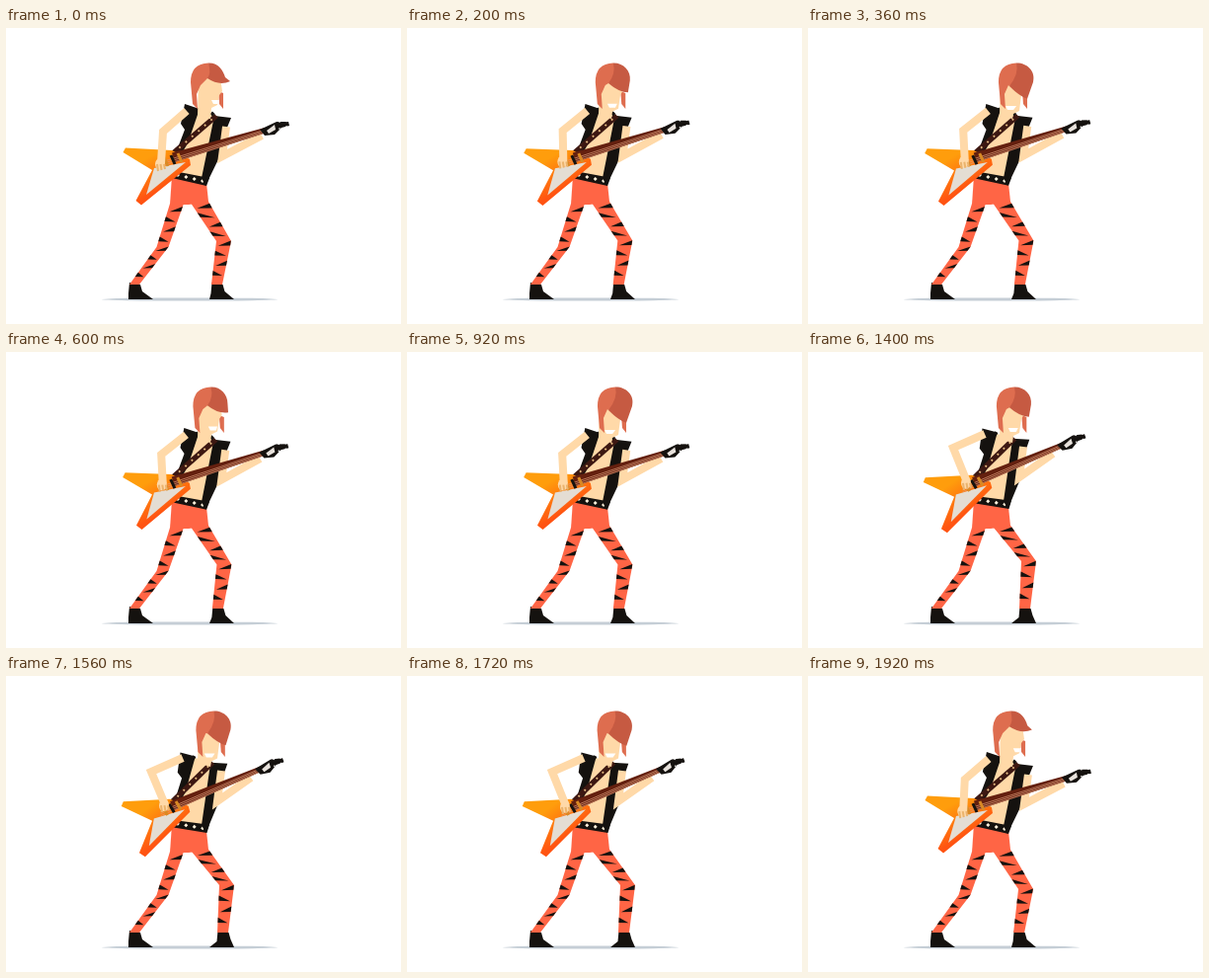
Write an HTML page with a canvas that moves like this. It is 400 px wide and 300 px high and loops after 1960 ms.

```html
<!DOCTYPE html>
<html lang="en">
<head>
<meta charset="utf-8">
<title>Guitarist</title>
<style>
html, body { margin: 0; width: 100%; height: 100%; overflow: hidden; background: #fff; }
canvas { display: block; width: 400px; height: 300px; }
</style>
</head>
<body>
<canvas id="stage" width="400" height="300"></canvas>
<script>
const ctx = document.getElementById('stage').getContext('2d');
const LOOP = 1960, STEP = 40;
const SKIN = '#ffd9a8', BLACK = '#15120f', PANTS = '#ff6545';
const HAIR = '#de6d4f', FRINGE = '#c65a42', STRAP = '#3d1812', CREAM = '#fff1dc';

const lerp = (a, b, k) => a + (b - a) * k;
const mix = (a, b, k) => a.map((v, i) => lerp(v, b[i], k));

// Eased value between [time, value] keys
function track(keys, t) {
  const i = Math.max(1, keys.findIndex(key => key[0] >= t));
  const [t0, a] = keys[i - 1], [t1, b] = keys[i];
  const k = (t - t0) / (t1 - t0);
  return lerp(a, b, k * k * (3 - 2 * k));
}

const HEAD = [[0, 0], [340, 1], [630, .38], [940, 1], [1320, .6], [1680, 1], [1920, .03], [LOOP, 0]];
const LEAN = [[0, 0], [300, .15], [980, .15], [1300, 1], [1730, 1], [1920, .02], [LOOP, 0]];

function poly(fill, ...points) {
  ctx.beginPath();
  points.forEach(p => ctx.lineTo(...p));
  ctx.closePath();
  ctx.fillStyle = fill;
  ctx.fill();
}

function stroke(color, width, ...points) {
  ctx.beginPath();
  points.forEach(p => ctx.lineTo(...p));
  ctx.strokeStyle = color;
  ctx.lineWidth = width;
  ctx.stroke();
}

function oval(fill, x, y, rx, ry) {
  ctx.beginPath();
  ctx.ellipse(x, y, rx, ry, 0, 0, Math.PI * 2);
  ctx.fillStyle = fill;
  ctx.fill();
}

// Evenly spaced diamonds from one point to another
function studs(color, from, to, n, r) {
  for (let i = 0; i < n; i++) {
    const [x, y] = mix(from, to, i / (n - 1));
    poly(color, [x - r, y], [x, y - r], [x + r, y], [x, y + r]);
  }
}

function turned(pivot, angle, shift, paint) {
  ctx.save();
  ctx.translate(pivot[0] + shift[0], pivot[1] + shift[1]);
  ctx.rotate(angle);
  ctx.translate(-pivot[0], -pivot[1]);
  paint();
  ctx.restore();
}

// Joints are [x, y, half width]; k runs from hip to ankle, side is -1 or 1
function leg(joints) {
  const edge = (k, side) => {
    const i = k < .5 ? 0 : 1;
    const [x, y, w] = mix(joints[i], joints[i + 1], k * 2 - i);
    return [x + side * w, y];
  };
  const side = s => [0, .5, 1].map(k => edge(k, s));
  poly(PANTS, ...side(-1), ...side(1).reverse());
  for (let i = 0; i < 8; i++) {
    const k = .06 + i * .115, s = i % 2 ? -1 : 1;
    const tip = mix(edge(k, s), edge(k + .04, -s), .85);
    poly(BLACK, edge(k - .025, s), edge(k + .03, s), tip);
  }
}

function boot(x, y, toe) {
  poly(BLACK, [x - 5, y - 2], [x + 6, y], [x + 8, y + 7], [toe, 275], [toe - 25, 275], [x - 6, y + 9]);
}

function legs(b) {
  const foot = 213.5 + 6 * b;
  boot(130, 260, 149);
  boot(foot, 260, 231);
  poly(PANTS, [168, 150], [203, 157], [205, 176], [185, 179], [180, 179], [166, 179]);
  leg([[173, 178, 7], [158.5, 222, 6], [130, 260, 5]]);
  leg([[195, 175, 9.5], [220.5 + 3 * b, 216 - 4 * b, 7.5], [foot, 260, 5.5]]);
}

function torso() {
  poly(SKIN, [188, 81], [216, 90], [202, 155], [172, 148]);
  poly(BLACK, [170, 145], [206, 152], [203, 160], [168, 152]);
  studs(CREAM, [174, 149], [199, 155], 4, 2);
  poly(BLACK, [181, 77], [196, 82], [184, 117], [176, 130], [173, 124], [181, 103], [177, 97]);
  poly(BLACK, [211, 89], [228, 91], [221, 108], [219, 125], [202, 160], [198, 152], [203, 128]);
  stroke(STRAP, 5.5, [213, 89], [168, 128]);
  studs('#e7bd83', [208, 93], [176, 121], 6, 1.3);
  studs(BLACK, [194, 83], [209, 87], 2, 2.5);
}

function guitarBody() {
  const paint = ctx.createLinearGradient(143, 132, 160, 162);
  paint.addColorStop(0, '#ff9d0c');
  paint.addColorStop(1, '#ff5312');
  poly(paint, [121, 121.5], [168, 124], [186, 133], [187, 139], [137, 179.5], [131.5, 175], [148, 144], [118.5, 126]);
  poly('#e4ddd3', [150, 142], [182, 136], [142, 169]);
}

function guitarNeck() {
  poly('#64200f', [168, 126.5], [262, 101], [264, 106], [171, 136]);
  for (let i = 0; i < 3; i++)
    stroke('#dd9a78', .7, [157, 136 + i * 2], [266, 102 + i * 1.4]);
  for (let i = 0; i < 3; i++) {
    const x = 160 + i * 7, y = 131 - i * 2;
    stroke(i % 2 ? BLACK : '#d98a24', 3, [x, y], [x + 4, y + 9]);
  }
  poly(BLACK, [257, 103], [274, 95], [286, 95], [287, 99], [279, 101], [272, 108], [262, 109]);
  poly('#e8e2dc', [264, 104], [272, 98], [273, 103], [266, 107]);
  studs('#fff', [277, 95], [284, 94.5], 2, 1);
  studs('#fff', [277, 102], [284, 100], 2, 1);
}

function frettingArm(b) {
  const elbow = mix([219, 130], [214, 127], b), hand = mix([259, 109], [248, 103], b);
  stroke(SKIN, 8, mix([223, 100], [218, 96], b), elbow, hand);
}

function strummingArm(b, t) {
  const sway = Math.sin(t / LOOP * Math.PI * 12) * .8;
  const reach = Math.min(1, b * 3);
  const hand = [lerp(157, 161, reach), lerp(137, 131, reach) + sway];
  stroke(SKIN, 8, mix([183, 84], [179, 83], b), mix([159, 105], [147, 97], b), hand);
  oval(SKIN, hand[0] - 1, hand[1] + 1, 5, 6);
  for (let i = 0; i < 3; i++) {
    const x = hand[0] - 4 + i * 3.5, y = hand[1] + 4;
    stroke('#eab36d', 2, [x, y - 3], [x + 1, y + 4 - i]);
  }
}

// h turns the head from profile (0) to bowed front view (1)
function head(h) {
  const left = lerp(187, 193, h), chin = lerp(81, 87, h), smile = lerp(208, 200, h);
  const top = mix([205, 35.5], [211, 35.5], h), tip = mix([227, 54], [222, 72], h);
  const part = mix([204, 51], [204, 59], h);
  const strand = x => poly(HAIR, [x, 64], [x + 5, 66], [x + 5, 82], [x + 1, 77]);

  strand(lerp(215, 217, h));
  poly(SKIN, [195, 50], [217, 50], [lerp(219, 218, h), 64], [216, 68], [214, chin - 3],
    [208, chin], [207, 92], [194, 88]);
  const my = lerp(73, 79, h);
  poly('#fff', [smile, my], [smile + lerp(8, 11, h), my], [smile + 8, my + 4], [smile + 2, my + 4]);

  ctx.fillStyle = HAIR;
  ctx.beginPath();
  ctx.moveTo(...top);
  ctx.quadraticCurveTo(left, 36, left, 55);
  ctx.lineTo(left + 2, 77);
  ctx.lineTo(left + 7, 82);
  ctx.lineTo(left + 6, 67);
  ctx.lineTo(left + 10, 58);
  ctx.lineTo(...part);
  ctx.lineTo(top[0] + 8, 50);
  ctx.fill();

  ctx.fillStyle = FRINGE;
  ctx.beginPath();
  ctx.moveTo(...top);
  ctx.bezierCurveTo(top[0] + 10, 35, lerp(220, 231, h), 43, ...mix([222, 50], [228, 55], h));
  ctx.lineTo(...tip);
  ctx.quadraticCurveTo(lerp(216, 214, h), lerp(59, 69, h), ...part);
  ctx.quadraticCurveTo(top[0] + 3, 46, ...top);
  ctx.fill();
}

function draw(t) {
  const h = track(HEAD, t), b = track(LEAN, t);
  const guitar = paint => turned([165, 135], -.107 * b, [-b, b], paint);
  ctx.clearRect(0, 0, 400, 300);
  oval('#c5ced6', 186, 275, 89, 1.6);
  legs(b);
  turned([187, 152], -.06 * b, [0, 0], torso);
  head(h);
  guitar(guitarBody);
  frettingArm(b);
  guitar(guitarNeck);
  strummingArm(b, t);
}

const start = performance.now();
function frame(now) {
  const t = Math.max(0, now - start) % LOOP;
  draw(Math.floor(t / STEP) * STEP);
  requestAnimationFrame(frame);
}
draw(0);
requestAnimationFrame(frame);
</script>
</body>
</html>
```
